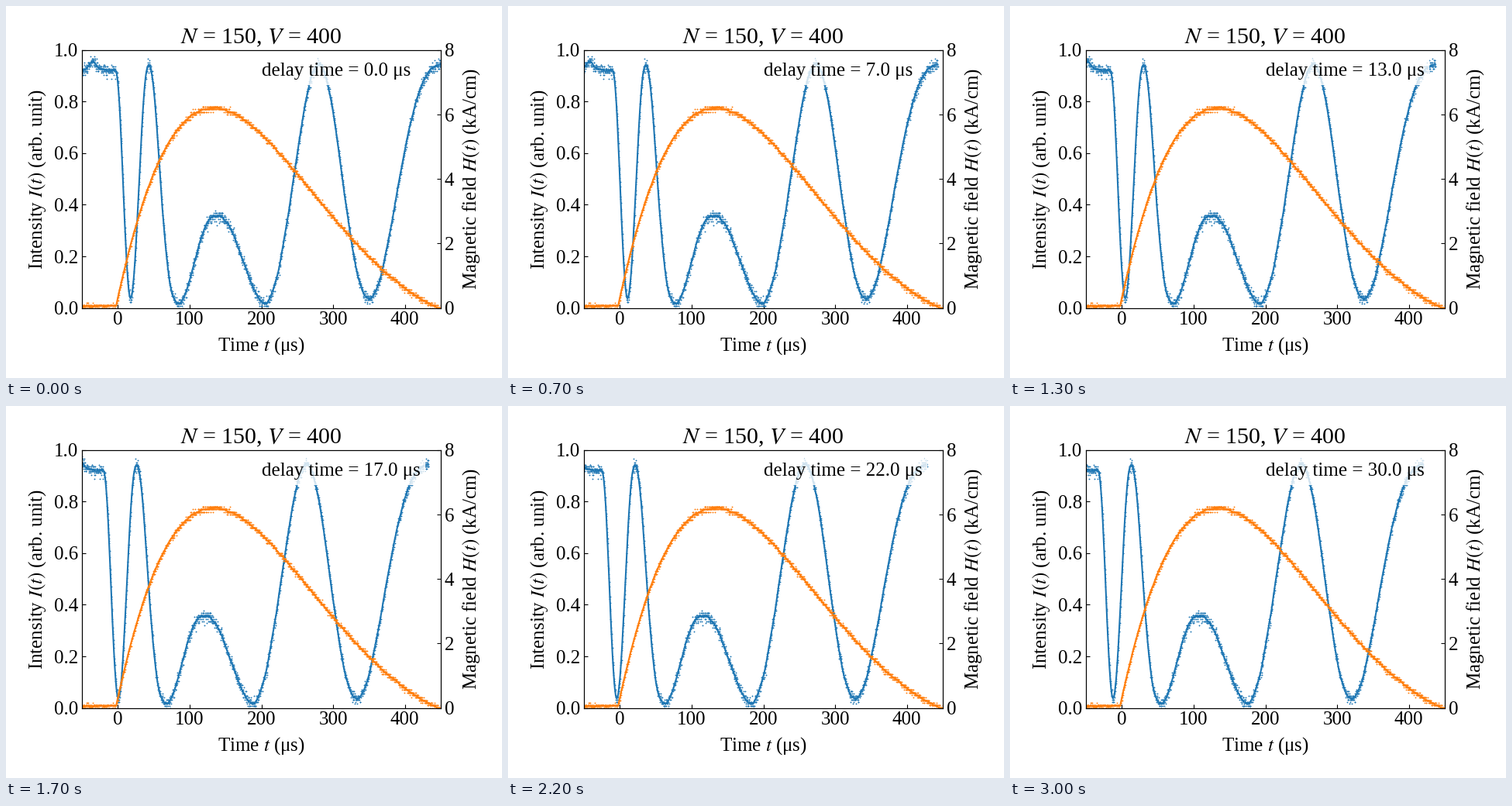
Recreate the animation shown at these times as a matplotlib script. Size 640 px wide and 480 px high, loop 3100 ms.

```python
import numpy as np
import matplotlib.pyplot as plt
from matplotlib.animation import FuncAnimation

plt.rcParams.update({
    "font.family": "Liberation Serif",
    "mathtext.fontset": "stix",
    "font.size": 18,
    "axes.labelpad": 6,
    "xtick.direction": "in",
    "ytick.direction": "in",
})

W, H, DPI = 640, 480, 100
BLUE, ORANGE = "tab:blue", "tab:orange"

PULSE_START, PULSE_LENGTH, PEAK_DELAY, PEAK_FIELD = -3, 447, 136, 6.2

# Turning points of the intensity: time, value, skew of the swing that ends there
TURNS = [
    (-3, .92, 1), (17.7, .035, 1), (43.6, .948, 1.11), (85, .019, 1.4),
    (139, .358, 1.27), (204.5, .019, .91), (280, .947, .94),
    (350.5, .035, 1.08), (455, .945, 1.38),
]


def intensity_curve(t):
    """Skewed cosine swings between turning points, after a small bump."""
    bump = 0.035 * np.exp(-((t + 35) / 8) ** 2)
    y = TURNS[0][1] + bump
    for (t0, y0, _), (t1, y1, skew) in zip(TURNS, TURNS[1:]):
        u = np.clip((t - t0) / (t1 - t0), 0, 1)
        swing = (1 - np.cos(np.pi * (1 - (1 - u) ** skew))) / 2
        y = np.where(t >= t0, y0 + (y1 - y0) * swing, y)
    return y


def field_curve(t):
    """Damped sine pulse of a discharging coil over a small offset."""
    omega = np.pi / PULSE_LENGTH
    damping = omega / np.tan(omega * PEAK_DELAY)

    def pulse(s):
        return np.exp(-damping * s) * np.sin(omega * s)

    s = np.clip(t - PULSE_START, 0, PULSE_LENGTH)
    return np.maximum(0.05 * (t < 400),
                      PEAK_FIELD * pulse(s) / pulse(PEAK_DELAY))


def measure(curve, noise, step):
    """Return quantised noisy samples and their smooth trend."""
    error = rng.normal(0, noise, curve.size)
    samples = np.round((curve + error) / step) * step
    trend = curve + np.convolve(error, np.ones(25) / 25, mode="same")
    return samples, trend


def draw_series(axes, t, samples, trend, color):
    dots, = axes.plot(t, samples, "+", ms=2, mew=0.6, color=color)
    line, = axes.plot(t, trend, lw=1.5, color=color)
    return dots, line


rng = np.random.default_rng(4)
time = np.arange(-50, 450.1, 0.25)
intensity = measure(intensity_curve(time), 0.011, 0.008)
field = measure(field_curve(time), 0.04, 0.08)

fig = plt.figure(figsize=(W / DPI, H / DPI), dpi=DPI, facecolor="white")
ax = fig.add_axes([98 / W, 90.45 / H, 463 / W, 332.64 / H])
ax.set(xlim=(-50, 450), ylim=(0, 1),
       xticks=range(0, 401, 100), yticks=np.arange(6) / 5)
ax.set_title("$N$ = 150, $V$ = 400")
ax.set_xlabel("Time $t$ (μs)")
ax.set_ylabel("Intensity $I(t)$ (arb. unit)")

ax_field = ax.twinx()
ax_field.set(ylim=(0, 8), yticks=range(0, 9, 2))
ax_field.set_ylabel("Magnetic field $H(t)$ (kA/cm)")

moving = draw_series(ax, time, *intensity, BLUE)
draw_series(ax_field, time, *field, ORANGE)
label = ax.text(200, 0.9, "", bbox=dict(facecolor="white",
                                        edgecolor="white", alpha=0.8))


def update(delay):
    for artist in moving:
        artist.set_xdata(time - delay)
    label.set_text(f"delay time = {delay:.1f} μs")
    return (*moving, label)


anim = FuncAnimation(fig, update, frames=31, interval=100, repeat=True)
plt.show()
```
